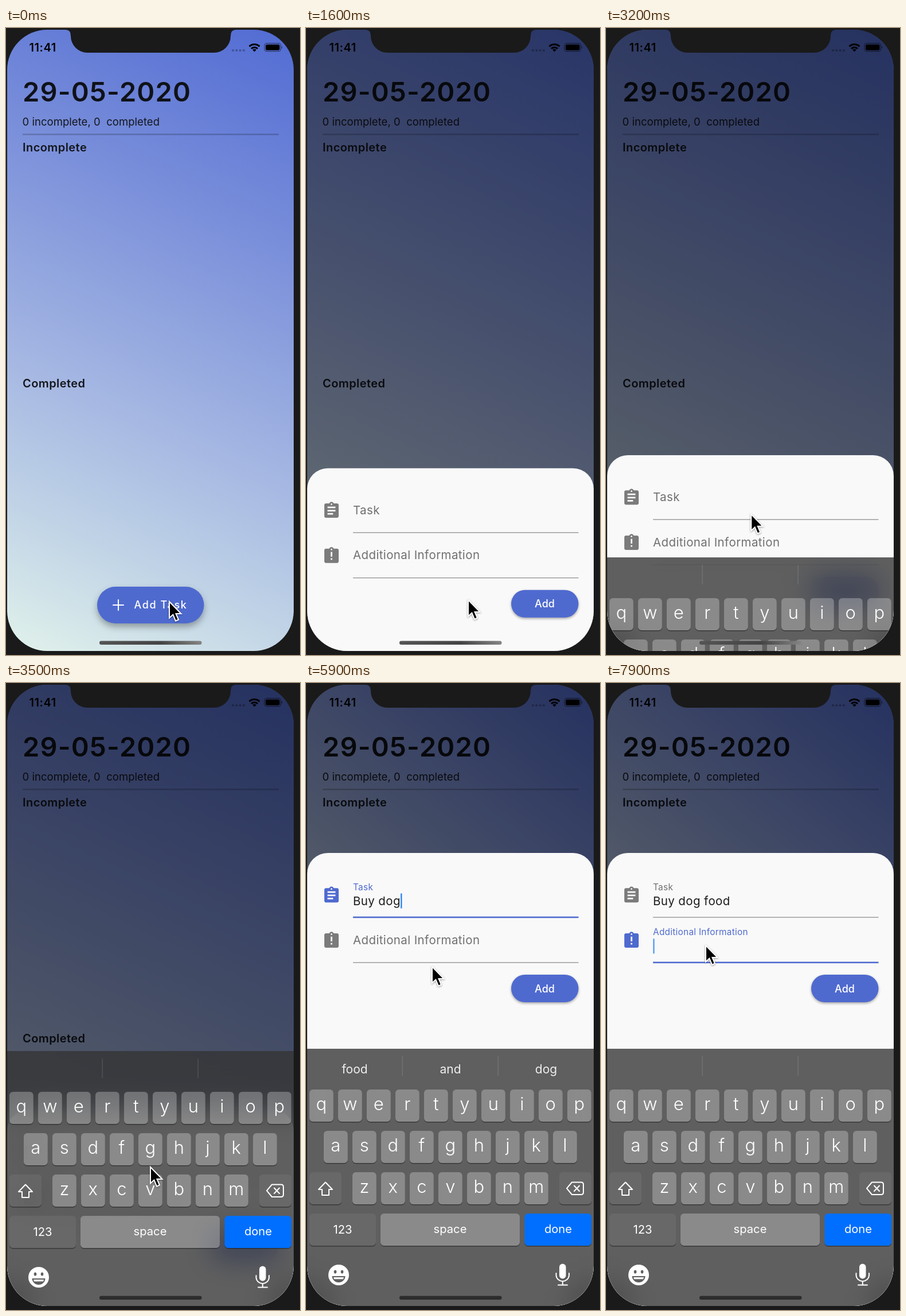
These frames come from a looping animation (513x1092 px, 8000 ms). An HTML page:

```html
<!DOCTYPE html>
<html lang="en">
<head>
<meta charset="utf-8">
<title>Task list</title>
<style>
html, body { margin: 0; width: 100%; height: 100%; overflow: hidden; background: #1a1a1a; }
svg, #screen, #keyboard { position: absolute; left: 0; top: 0; width: 513px; height: 1092px; }
#screen { overflow: hidden; clip-path: inset(3px 11px 7px 2px round 70px); }
#keyboard { height: 470px; background: rgba(52,52,52,.78); -webkit-backdrop-filter: blur(24px); backdrop-filter: blur(24px); }
#keyboard svg { height: 470px; }
text { font-family: Inter, Roboto, sans-serif; }
.head { font-size: 20px; font-weight: 600; letter-spacing: .43px; fill: #14161c; }
.field { font-size: 20.5px; letter-spacing: .38px; }
.mid { text-anchor: middle; fill: #fff; }
.key { font-size: 31px; font-weight: 300; }
.word { font-size: 20.2px; }
.hint { font-size: 21px; fill: #eee; }
.soft { filter: drop-shadow(0 2px 2px rgba(0,0,0,.35)); }
.line { fill: none; stroke: #fff; stroke-width: 2; stroke-linejoin: round; stroke-linecap: round; }
</style>
</head>
<body>
<div id="screen">
  <svg id="scene">
    <defs>
      <linearGradient id="sky" gradientUnits="userSpaceOnUse" x1="502" y1="3" x2="2" y2="1085">
        <stop stop-color="#516bd3"/>
        <stop offset=".33" stop-color="#7e93db"/>
        <stop offset=".6" stop-color="#a4b6e2"/>
        <stop offset=".8" stop-color="#c0d3e6"/>
        <stop offset="1" stop-color="#e1f2eb"/>
      </linearGradient>
    </defs>
    <rect width="513" height="1092" fill="url(#sky)"/>
    <text x="29" y="128" font-size="47" font-weight="600" letter-spacing="1.2" fill="#101218">29-05-2020</text>
    <text x="28.5" y="170" font-size="18.5" letter-spacing=".04" fill="#14161c" style="white-space:pre">0 incomplete, 0  completed</text>
    <rect x="29" y="184" width="447" height="2.6" fill="#000" opacity=".2"/>
    <text x="29" y="215" class="head">Incomplete</text>
    <text x="29" y="626" class="head">Completed</text>
    <rect x="159" y="973" width="186.5" height="64" rx="32" fill="#4f6acf" style="filter:drop-shadow(0 6px 6px rgba(0,0,0,.32))"/>
    <path d="M187 1005h18M196 996v18" class="line"/>
    <text x="223.5" y="1011" font-size="18" font-weight="500" letter-spacing="1.6" fill="#fff">Add Task</text>
    <rect id="barrier" width="513" height="1092"/>
    <g id="sheet">
      <rect x="2" width="500" height="900" rx="36" fill="#f9f9f9"/>
      <g class="soft"><rect x="358" y="212" width="117.5" height="48" rx="24" fill="#4f6acf"/></g>
      <text x="416.5" y="242.5" class="mid" font-size="18" font-weight="500">Add</text>
    </g>
  </svg>
  <div id="keyboard"><svg id="keys"></svg></div>
  <svg>
    <defs>
      <linearGradient id="bar"><stop offset="0" stop-color="#555"/><stop offset=".6" stop-color="#444"/><stop offset="1" stop-color="#858585"/></linearGradient>
    </defs>
    <text x="40.5" y="41" font-size="20" font-weight="600" letter-spacing=".55">11:41</text>
    <g opacity=".27"><circle cx="396" cy="39" r="2.1"/><circle cx="402.3" cy="39" r="2.1"/><circle cx="408.6" cy="39" r="2.1"/><circle cx="414.9" cy="39" r="2.1"/></g>
    <g fill="none" stroke="#000" stroke-width="3.1">
      <path d="M424.6 32.2a12.6 12.6 0 0 1 17.8 0M428 36a7.8 7.8 0 0 1 11 0"/>
    </g>
    <path d="M433.5 41.5l-3.2-3.4a4.6 4.6 0 0 1 6.4 0z"/>
    <rect x="451" y="26.7" width="28.5" height="14" rx="4" fill="none" stroke="#000" stroke-opacity=".5" stroke-width="1.2"/>
    <rect x="453" y="28.7" width="24.5" height="10" rx="2.3"/>
    <path d="M481 31.3q2.4 2.4 0 5z" opacity=".55"/>
    <rect id="home" x="163" y="1067.6" width="178.5" height="6.4" rx="3.2"/>
    <path d="M98 0V3H104Q113 3 113 14A29 29 0 0 0 142 43H363A29 29 0 0 0 392 14Q392 3 401 3H407V0z" fill="#1a1a1a"/>
  </svg>
</div>
<svg>
  <path id="pointer" d="M0 0V28.5L6.4 22.6L11 33.6L16 31.5L11.5 21H20.5z" stroke="#fff" stroke-width="2" style="filter:drop-shadow(0 1px 1.5px rgba(0,0,0,.4))"/>
</svg>
<script>
const $ = id => document.getElementById(id);
const BLUE = '#4f6acf', GREY = '#7b7b7b';
const clamp = v => Math.max(0, Math.min(1, v));
const smooth = v => v * v * (3 - 2 * v);

function add(parent, tag, attrs, text = '') {
  const el = document.createElementNS('http://www.w3.org/2000/svg', tag);
  set(el, attrs);
  el.textContent = text;
  parent.append(el);
  return el;
}
function set(el, attrs) {
  for (const k in attrs) el.setAttribute(k, attrs[k]);
}

// Form fields
const BOARD = 'M19 3h-4.18C14.4 1.84 13.3 1 12 1c-1.3 0-2.4.84-2.82 2H5c-1.1 0-2 .9-2 2v14c0 1.1.9 2 2 2h14c1.1 0 2-.9 2-2V5c0-1.1-.9-2-2-2zm-7 0c.55 0 1 .45 1 1s-.45 1-1 1-1-.45-1-1 .45-1 1-1z';
function makeField(name, y, mark) {
  const g = add($('sheet'), 'g', { transform: `translate(0 ${y})` });
  return {
    icon: add(g, 'path', { d: BOARD + mark, 'fill-rule': 'evenodd', transform: 'translate(27.8 57.1) scale(1.39)' }),
    rule: add(g, 'rect', { x: 82, width: 393.5 }),
    label: add(g, 'text', { class: 'field' }, name),
    value: add(g, 'text', { class: 'field', x: 82, y: 91, fill: '#1c1c1c' }),
    caret: add(g, 'rect', { y: 70.5, width: 2.4, height: 26, fill: '#2b86f5' })
  };
}
const task = makeField('Task', 0, 'M14 17H7v-2h7zM17 13H7v-2h10zM17 9H7V7h10z');
const info = makeField('Additional Information', 78.8, 'M13 17h-2v-2h2zM13 13h-2V7h2z');

function drawField(f, active, float, text, caret) {
  const tint = active ? BLUE : GREY;
  set(f.icon, { fill: tint });
  set(f.rule, active ? { y: 110.7, height: 2.6, fill: BLUE } : { y: 111.4, height: 1.4, fill: '#979797' });
  set(f.label, { fill: active ? BLUE : '#707070',
    transform: `translate(82 ${79.8 - 15.2 * float}) scale(${1 - .25 * float})` });
  if (f.value.textContent !== text) f.value.textContent = text;
  set(f.caret, { x: 82.2 + (text ? f.value.getComputedTextLength() : 0), opacity: active ? caret : 0 });
}

// Keyboard
const keys = $('keys');
function key(x, y, w, fill) {
  add(keys, 'path', { d: `M${x} ${y + 50}a6 6 0 0 0 6 6h${w - 12}a6 6 0 0 0 6-6v1.4a6 6 0 0 1-6 6h${12 - w}a6 6 0 0 1-6-6z`, opacity: .4 });
  add(keys, 'rect', { x, y, width: w, height: 56, rx: 6, fill });
}
const LIGHT = 'rgba(255,255,255,.27)', DARK = 'rgba(255,255,255,.055)';
[['qwertyuiop', 6, 71], ['asdfghjkl', 31, 143], ['zxcvbnm', 81, 215]].forEach(([row, x0, y]) =>
  [...row].forEach((c, i) => {
    const x = x0 + i * 50;
    key(x, y, 41.7, LIGHT);
    add(keys, 'text', { class: 'mid key', x: x + 20.8, y: y + 35.8 }, c);
  }));
key(6, 215, 56, DARK);
key(442, 215, 56, DARK);
key(6, 287, 116, DARK);
key(130, 287, 243, LIGHT);
key(381.5, 287, 116.5, '#006fff');
const word = (x, y, s, look = 'word') => add(keys, 'text', { class: 'mid ' + look, x, y }, s);
word(64, 322, '123');
word(251.5, 320.5, 'space');
word(440, 320.5, 'done');
const hints = [85, 252, 419].map(x => word(x, 42.5, '', 'hint'));
for (const x of [167.5, 334.5]) add(keys, 'rect', { x, y: 13, width: 1.2, height: 34, fill: '#fff', opacity: .14 });
add(keys, 'path', { class: 'line', d: 'M34 232.5L46 245H40V255H28V245H22z' });
add(keys, 'path', { class: 'line', d: 'M464 232.5H480Q484 232.5 484 236.5V250Q484 254 480 254H464L455 243.2zM468 238.5l9 9.5m0-9.5l-9 9.5' });
add(keys, 'circle', { cx: 57, cy: 394, r: 18, fill: '#fff' });
add(keys, 'path', { fill: '#5f5f5f', d: 'M45.5 396H68.5A11.5 11 0 0 1 45.5 396z' });
add(keys, 'path', { fill: '#fff', d: 'M48 398H66L65 401.3H49z' });
for (const cx of [51, 63]) add(keys, 'ellipse', { cx, cy: 388.5, rx: 2.3, ry: 3, fill: '#5f5f5f' });
add(keys, 'rect', { x: 442, y: 374.5, width: 11.5, height: 26, rx: 5.75, fill: '#fff' });
add(keys, 'path', { class: 'line', d: 'M436.5 391V395A11.3 11 0 0 0 459 395V391M447.8 406V411.5M440 411.5H456' });

// Timeline
const OPEN = 1434, RISE = 3130, LIFT = 4000, SWITCH = 7600;
const TYPED = 'Buy dog food';
const STROKES = [4500, 4700, 4900, 5050, 5250, 5450, 5650, 5850, 6100, 6300, 6450, 6650];
const PATH = [[0, 285, 999], [1300, 285, 999], [1550, 283, 996], [1900, 283, 996], [2600, 254, 849], [3000, 254, 849],
  [3500, 252, 843], [3850, 220, 494], [6900, 220, 494], [7450, 174, 457], [8000, 174, 457]];

// Cubic curve with control points (0, 0) and (.2, 1)
function decelerate(x) {
  let lo = 0, hi = 1;
  for (let i = 0; i < 20; i++) {
    const u = (lo + hi) / 2;
    if (.6 * u * u * (1 - u) + u ** 3 < x) lo = u; else hi = u;
  }
  return smooth(hi);
}
function pointerAt(t) {
  const i = PATH.findIndex(p => p[0] > t);
  const [t0, x0, y0] = PATH[i - 1], [t1, x1, y1] = PATH[i];
  const s = smooth((t - t0) / (t1 - t0));
  return `translate(${x0 + (x1 - x0) * s} ${y0 + (y1 - y0) * s})`;
}
function blink(t) {
  const p = t % 1000;
  return Math.max(clamp((500 - p) / 250), clamp((p - 850) / 150));
}

function draw(t) {
  const lifted = t >= LIFT, second = t >= SWITCH;
  const shown = decelerate(clamp((t - OPEN) / 250));
  set($('sky'), { y2: lifted ? 637 : 1085 });
  set($('barrier'), { opacity: .54 * shown });
  set($('sheet'), { transform: `translate(0 ${lifted ? 296 : 744 + 348 * (1 - shown)})` });

  const count = STROKES.filter(s => s <= t).length;
  const typing = t >= STROKES[0] && t < STROKES[11] + 200;
  const caret = typing ? 1 : blink(t - (second ? SWITCH : t < STROKES[0] ? LIFT : STROKES[11] + 200));
  drawField(task, lifted && !second, lifted ? 1 : 0, TYPED.slice(0, count), caret);
  drawField(info, second, smooth(clamp((t - SWITCH) / 200)), '', caret);

  // Critically damped spring
  const x = Math.max(0, t - RISE) * .0183;
  $('keyboard').style.display = t > RISE ? '' : 'none';
  $('keyboard').style.top = 637 + 455 * (1 + x) * Math.exp(-x) + 'px';
  const hinted = t >= 5850 && !second;
  ['food', 'and', 'dog'].forEach((s, i) => hints[i].textContent = hinted ? s : '');
  set($('home'), { fill: x > 2 ? '#2c2c2c' : 'url(#bar)' });
  set($('pointer'), { transform: pointerAt(t) });
}

const start = performance.now();
function tick() {
  draw((performance.now() - start) % 8000);
  requestAnimationFrame(tick);
}
tick();
</script>
</body>
</html>
```
